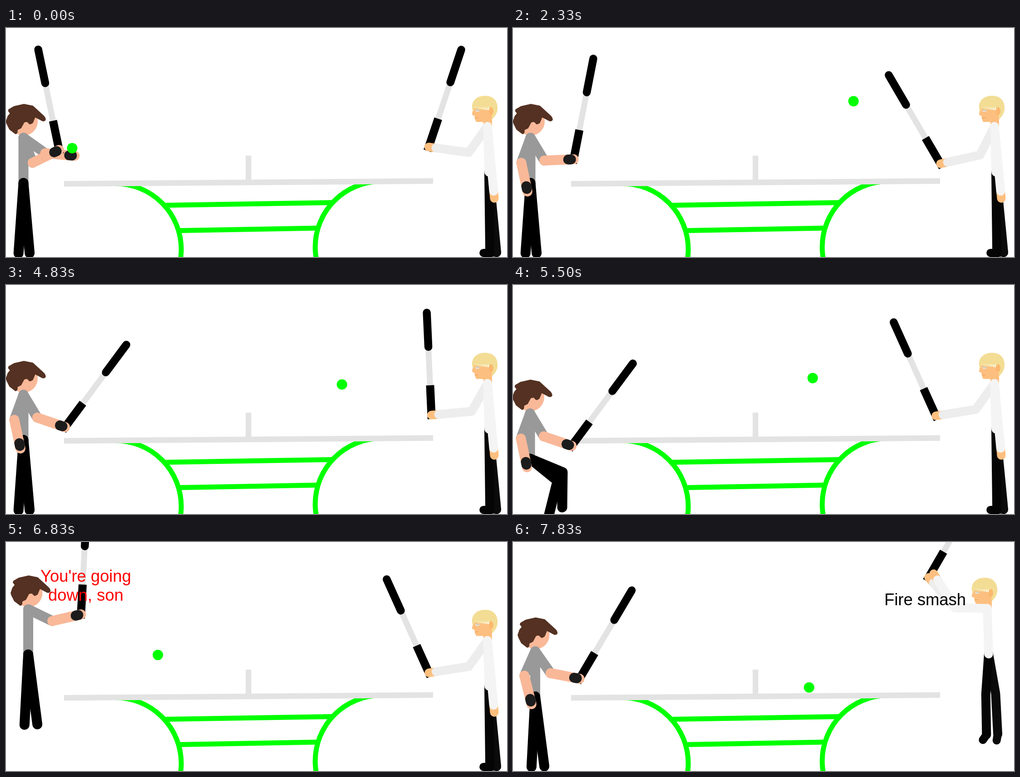
Write an HTML page with a canvas that moves like this. It is 1105 by 507 pixels and loops after 8000 ms.

```html
<!DOCTYPE html>
<html lang="en">
<head>
<meta charset="utf-8">
<title>Bat tennis</title>
<style>
  html, body { margin: 0; width: 100%; height: 100%; overflow: hidden; background: #fff; }
  canvas { display: block; }
</style>
</head>
<body>
<canvas id="stage" width="1105" height="507"></canvas>
<script>
const ctx = document.getElementById('stage').getContext('2d');
const LOOP = 8000, FPS = 6;
const GREEN = '#00ff00', PALE = '#e3e3e3', TAN = '#f9b898', PEACH = '#fdbf7f';

// A move is [from, to, ...values]: values are reached between two frames, then held.
function valuesAt(moves, frame) {
  let [, , ...values] = moves[0];
  for (const [from, to, ...goal] of moves.slice(1)) {
    if (frame <= from) break;
    const u = Math.min(1, (frame - from) / (to - from));
    values = values.map((v, i) => v + (goal[i] - v) * u);
  }
  return values;
}

function polar([x, y], angle, length) {
  const r = angle * Math.PI / 180;
  return [x + length * Math.cos(r), y + length * Math.sin(r)];
}

function line(color, width, points, cap = 'round') {
  ctx.strokeStyle = color;
  ctx.lineWidth = width;
  ctx.lineCap = cap;
  ctx.lineJoin = 'round';
  ctx.beginPath();
  points.forEach(p => ctx.lineTo(...p));
  ctx.stroke();
}

function ellipse(color, x, y, rx, ry = rx) {
  ctx.fillStyle = color;
  ctx.beginPath();
  ctx.ellipse(x, y, rx, ry, 0, 0, 7);
  ctx.fill();
}

function shape(color, path) {
  ctx.fillStyle = color;
  ctx.fill(new Path2D(path));
}

function at([x, y], draw) {
  ctx.save();
  ctx.translate(x, y);
  draw();
  ctx.restore();
}

function bat(hand, angle) {
  const along = d => polar(hand, angle - 90, d);
  line(PALE, 13, [along(60), along(152)], 'butt');
  line('#000', 18, [along(-9), along(66)], 'butt');
  line('#000', 17.5, [along(151), along(227)]);
}

function table() {
  ctx.strokeStyle = GREEN;
  ctx.lineWidth = 11;
  ctx.lineCap = 'butt';
  for (const [x, y, from, to] of [[241, 490, -1.57, .4], [827.5, 485, 2.74, 4.71]]) {
    ctx.beginPath();
    ctx.arc(x, y, 145.5, from, to);
    ctx.stroke();
  }
  line(GREEN, 11, [[350, 392.5], [720, 386.5]], 'butt');
  line(GREEN, 11, [[384, 448.5], [688, 443]], 'butt');
  line(PALE, 12.5, [[128, 345], [942, 338.8]], 'butt');
  line(PALE, 12.5, [[534.8, 282.5], [534.8, 338]], 'butt');
}

// Limb angles are in degrees clockwise from the right; bat angles from upright.
function leftPlayer(frame) {
  const [dx, dy] = valuesAt([
    [0, 0, 0, 0], [30, 33, -1, 41.5], [33, 35, 10.5, -94], [43, 44, 10.5, -80], [44, 46, 10.5, -1]
  ], frame);
  const [batUpper, batFore, batAngle] = valuesAt([
    [0, 0, 70, -26, -11.7], [0, 2, 74, -32, -17], [2, 4, 70, -22, -12], [4, 6, 59, -2.6, 11],
    [18, 21, 80, -20, -30], [21, 23, 59, 19, 36.5], [33, 35, 40, 0, 20], [35, 38, 26, -13, 3.2],
    [41, 43, 20, -35, -14], [43, 44, 40, 0, 50], [44, 46, 55, 11, 30.5]
  ], frame);
  const shoulder = [38.5 + dx, 243 + dy], hip = [38.5 + dx, 343 + dy];
  const arm = (upper, fore) => {
    const elbow = polar(shoulder, upper, 59), hand = polar(elbow, fore, 65);
    return { hand, draw() {
      line('#999', 22, [shoulder, elbow]);
      line(TAN, 22, [elbow, hand]);
      line('#1c1c1c', 22, [polar(elbow, fore, 53), polar(elbow, fore, 59)]);
    } };
  };

  at(shoulder, () => {
    ellipse(TAN, .5, -36, 31);
    shape('#543122', 'M-39-36L-35-48-30-54-34-59-33-63-21-70 1-75 21-71 33-60 46-48Q50-43 49-39Q46-35 41-37L26-45 21-33Q17-29 13-30L8-35 2-34-5-21-13-17Q-12-8-18-8L-31-18-37-30Z');
  });
  line('#999', 22, [shoulder, hip]);

  const legs = valuesAt([
    [0, 0, 94, 94, 85, 85], [30, 33, 39, 104, 22.6, 90.7], [33, 35, 93, 93, 82.6, 82.6]
  ], frame);
  for (const i of [0, 2]) {
    const knee = polar(hip, legs[i], 78);
    line('#000', 22, [hip, knee, polar(knee, legs[i + 1], 78)]);
  }

  const freeArm = valuesAt([
    [0, 0, 35.5, 5], [0, 2, 32, -12], [2, 4, 60, 30], [4, 6, 110, 78], [33, 35, 70, 40],
    [35, 38, 26, -13], [41, 43, 20, -35], [43, 44, 50, 20], [44, 46, 114, 76]
  ], frame);
  const holding = arm(batUpper, batFore);
  arm(...freeArm).draw();
  bat(holding.hand, batAngle);
  holding.draw();
}

function rightHead() {
  shape(PEACH, 'M-31-42L-34-28Q-35-25-29-24L-28-17-25-10-9-10-9 0 10 0 10-35Z');
  ellipse('#e7e5df', -22, -35, 5, 2.5);
  line('#9b9b91', 1, [[-27, -37], [-18, -35]]);
  line('#dc9560', 1, [[-27, -19], [-21, -19]]);
  let fringe = 'M-33-36C-38-55-25-68-5-68S24-54 22-36Q20-25 10-16L9-27 4-33';
  for (let i = 0; i < 9; i++) fringe += `L${2 - i * 3.8}-44L${-i * 3.8}-34`;
  shape('#f3dd94', fringe + 'Z');
  ellipse('#fbb870', 8, -34, 5, 9);
}

function rightPlayer(frame) {
  const [dx, dy] = valuesAt([[0, 0, 0, 0], [42, 44, -4, 24], [44, 46, -16, -71]], frame);
  const [batUpper, batFore, batAngle] = valuesAt([
    [0, 0, 125.7, 187.9, 18.4], [9, 11, 120, 190, 41], [11, 13, 117, 167.5, -30.2],
    [28, 30, 122, 182, 25], [30, 32, 125.7, 171, -24.2], [42, 44, 140, 190, -8], [44, 46, 181, 229, 30]
  ], frame);
  const shoulder = [1062 + dx, 218 + dy], hip = [1065 + dx, 319 + dy];
  const arm = (color, upper, fore) => {
    const elbow = polar(shoulder, upper, 71), hand = polar(elbow, fore, 89);
    return { hand, draw() {
      line(PEACH, 19, [polar(elbow, fore, 70), hand]);
      line(color, 19.5, [shoulder, elbow, polar(elbow, fore, 73)]);
    } };
  };

  const holding = arm('#ededed', batUpper, batFore);
  bat(holding.hand, batAngle);
  holding.draw();

  const legs = valuesAt([
    [0, 0, 84.5, 84.5, 180, 89.3, 89.3, 180],
    [42, 44, 115, 65, 180, 125, 60, 180],
    [44, 46, 80, 87, 100, 94, 89, 125]
  ], frame);
  ['#0b0b0b', '#050505'].forEach((color, i) => {
    const [thigh, shin, shoe] = legs.slice(i * 3);
    const knee = polar(hip, thigh, 89), ankle = polar(knee, shin, 90);
    line(color, 20, [hip, knee, ankle]);
    line(color, 18, [ankle, polar(ankle, shoe, 14)]);
  });
  at(shoulder, rightHead);
  line('#f4f4f4', 19.5, [shoulder, hip]);

  const freeArm = valuesAt([[0, 0, 84.6, 84.6], [42, 44, 110, 130], [44, 46, 181, 238]], frame);
  arm('#f4f4f4', ...freeArm).draw();
}

function ball(frame) {
  // frame, x, y, bulge of the path leading here
  const stops = [
    [0, 146, 266], [4, 165, 205, -35], [5, 187, 205], [10, 688, 324, -3],
    [13, 850, 165, -30], [14, 751, 162], [18, 352, 325, -35], [21, 205, 180, -25],
    [22, 225, 178], [23, 314, 183], [27, 599, 324, -30], [30, 812, 195, -20],
    [31, 820, 190], [33, 661, 206], [35, 498, 262, -6], [37, 425, 325],
    [41, 335, 250, -6], [43, 290, 235], [44, 270, 232], [47, 653, 322]
  ];
  const next = Math.max(1, stops.findIndex(stop => stop[0] >= frame));
  const [from, x0, y0] = stops[next - 1], [to, x1, y1, bulge = 0] = stops[next];
  const u = (frame - from) / (to - from);
  ellipse(GREEN, x0 + (x1 - x0) * u, y0 + (y1 - y0) * u + 4 * bulge * u * (1 - u), 11.5);
}

function caption(text, x, y, color) {
  ctx.fillStyle = color;
  ctx.font = '36.4px "Liberation Sans", Arial, sans-serif';
  ctx.textAlign = 'center';
  ctx.fillText(text, x, y);
}

function draw(frame) {
  ctx.fillStyle = '#fff';
  ctx.fillRect(0, 0, 1105, 507);
  table();
  rightPlayer(frame);
  leftPlayer(frame);
  ball(frame);
  if (frame >= 37 && frame < 43) {
    caption("You're going", 176, 87.5, '#f00');
    caption('down, son', 176, 130, '#f00');
  }
  if (frame >= 45) caption('Fire smash', 909, 140, '#000');
}

const start = performance.now();
function tick() {
  const time = (performance.now() - start) % LOOP;
  draw(Math.floor((time + 4) * FPS / 1000) % (LOOP * FPS / 1000));
  requestAnimationFrame(tick);
}
tick();
</script>
</body>
</html>
```
